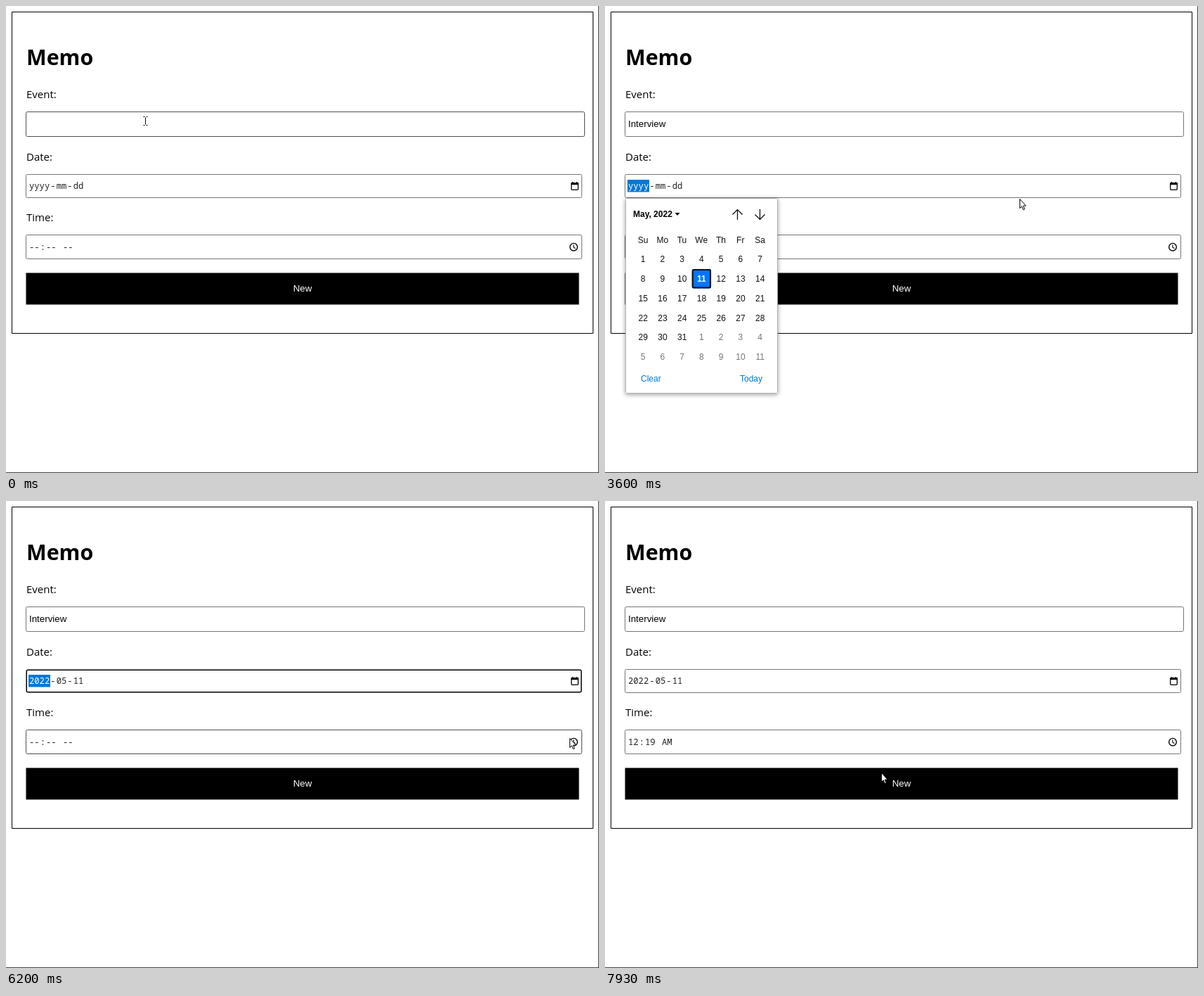
An HTML page with a canvas for the animation above (8000 ms loop, 844 px wide and 664 px high).

```html
<!DOCTYPE html>
<html lang="en">
<head>
<meta charset="utf-8">
<title>Memo form</title>
<style>
html, body { margin: 0; width: 100%; height: 100%; overflow: hidden; background: #fff; }
canvas { display: block; }
</style>
</head>
<body>
<canvas id="stage" width="844" height="664"></canvas>
<script>
const ctx = document.getElementById('stage').getContext('2d');
const LOOP = 8000, STEP = 1000 / 15;
const SANS = '"Liberation Sans", Arial, sans-serif';
const UI = '"Open Sans", "Noto Sans", sans-serif';
const MONO = '12.2px "Noto Sans Mono", monospace';
const INK = '#101010', BLUE = '#0075ff', HOVER = '#b3d4ff', MARK = '#0078d7';

// Moments of the interaction
const FOCUS = 70, DATE_OPEN = 3330, DATE_SET = 5130, TIME_OPEN = 6400, TIME_SET = 7200, TIME_CLOSE = 7730;

// Mouse moves from rest to rest
const START = { x: 198, y: 163 };
const MOVES = [
  { from: 2400, to: 2670, x: 806, y: 226 },
  { from: 2800, to: 3070, x: 822, y: 246 },
  { from: 3130, to: 3270, x: 809, y: 251 },
  { from: 3400, to: 3730, x: 475, y: 288 },
  { from: 3800, to: 4530, x: 156, y: 377 },
  { from: 4670, to: 4870, x: 139, y: 384 },
  { from: 5200, to: 6130, x: 802, y: 338 },
  { from: 6400, to: 6930, x: 143, y: 390 },
  { from: 7000, to: 7130, x: 166, y: 385 },
  { from: 7270, to: 7600, x: 369, y: 507 },
  { from: TIME_CLOSE, to: 7930, x: 393, y: 387 }
];

const ease = k => k * k * (3 - 2 * k);

function mouseAt(t) {
  return MOVES.reduce((p, m) => {
    const k = ease(Math.min(1, Math.max(0, (t - m.from) / (m.to - m.from))));
    return { x: p.x + (m.x - p.x) * k, y: p.y + (m.y - p.y) * k };
  }, START);
}

// Typing slows down a little from key to key
const keyTime = i => 800 + 125 * i + 6.25 * i * i;

const inside = (p, x, y, w, h) => p.x >= x && p.x < x + w && p.y >= y && p.y < y + h;

function rect(x, y, w, h, color) {
  ctx.fillStyle = color;
  ctx.fillRect(x, y, w, h);
}

function text(s, x, y, font, color = '#000', align = 'left') {
  ctx.font = font;
  ctx.fillStyle = color;
  ctx.textAlign = align;
  ctx.fillText(s, x, y);
}

function box(x, y, w, h, fill, stroke, width = 1, radius = 2) {
  ctx.beginPath();
  ctx.roundRect(x, y, w, h, radius);
  if (fill) { ctx.fillStyle = fill; ctx.fill(); }
  if (stroke) { ctx.strokeStyle = stroke; ctx.lineWidth = width; ctx.stroke(); }
}

function line(points, width = 1) {
  ctx.beginPath();
  points.forEach(([x, y]) => ctx.lineTo(x, y));
  ctx.strokeStyle = '#000';
  ctx.lineWidth = width;
  ctx.stroke();
}

function field(x, y, w, h, focused, hovered) {
  if (focused) box(x + 1.25, y + 1.25, w - 2.5, h - 2.5, '#fff', '#000', 1.5);
  else box(x + .5, y + .5, w - 1, h - 1, '#fff', hovered ? '#4f4f4f' : '#767676');
}

// Parts of a date or time value, the first one optionally selected
function segments(parts, baseline, selected) {
  let x = 32;
  parts.forEach((part, i) => {
    const pad = i % 2 ? 0 : 1;
    const w = part.length * 7.33 + pad * 2;
    const marked = selected && i === 0;
    if (marked) rect(x, baseline - 13, Math.round(w), 17.5, MARK);
    text(part, x + pad, baseline, MONO, marked ? '#fff' : '#222');
    x += w;
  });
}

function popup(x, y, w, h) {
  ctx.save();
  ctx.shadowColor = 'rgba(0,0,0,.4)';
  ctx.shadowBlur = 6;
  ctx.shadowOffsetY = 1.5;
  box(x, y, w, h, '#fff', null, 1, 1);
  ctx.restore();
  box(x + .5, y + .5, w - 1, h - 1, '#fff', '#b4b4b4', 1, 1);
}

function cell(label, x, y, w, h, size, { chosen, ring, hovered, color = INK }) {
  if (chosen || hovered) box(x, y, w, h, chosen ? BLUE : HOVER);
  if (ring) box(x + 1, y + 1, w - 2, h - 2, null, INK, 2);
  text(label, x + w / 2, y + h / 2 + size * .36, `${chosen ? 'bold ' : ''}${size}px ${SANS}`,
    chosen ? '#fff' : color, 'center');
}

// Vertical arrow, dir -1 points up and 1 points down
function arrow(x, dir) {
  const y = 296.5, tip = y + dir * 7;
  line([[x, y - dir * 7.5], [x, tip]], 1.2);
  line([[x - 7, y], [x, tip], [x + 7, y]], 1.2);
}

function calendar(mouse) {
  const pitch = 27.75, font = `12px ${SANS}`;
  popup(29, 273, 217, 278);
  text('May, 2022', 40, 300, `bold ${font}`);
  ctx.beginPath();
  ctx.moveTo(99.5, 294);
  ctx.lineTo(106.5, 294);
  ctx.lineTo(103, 298);
  ctx.fill();
  arrow(188.5, -1);
  arrow(220.5, 1);
  ['Su', 'Mo', 'Tu', 'We', 'Th', 'Fr', 'Sa'].forEach((day, i) =>
    text(day, 54 + i * pitch, 337, font, INK, 'center'));
  for (let i = 0; i < 42; i++) {
    const x = 40.5 + i % 7 * pitch, y = 346.25 + Math.floor(i / 7) * pitch;
    cell(i % 31 + 1, x, y, 27.3, 27.5, 12, {
      chosen: i === 10,
      ring: i === 10,
      hovered: inside(mouse, x, y, pitch, pitch),
      color: i > 30 ? '#767676' : INK
    });
  }
  text('Clear', 51, 534, font, MARK);
  text('Today', 192, 534, font, MARK);
}

function timeList(mouse, picked) {
  const two = n => String(n).padStart(2, '0');
  popup(29, 360, 171, 257);
  for (let row = 0; row < 7; row++) {
    [two(row || 12), two(19 + row), ['AM', 'PM'][row]].forEach((label, col) => {
      if (!label) return;
      const x = 33 + col * 55.5, y = 364 + row * 35.65;
      cell(label, x, y, 52, 35.3, 14, {
        chosen: row === 0,
        ring: row === 0 && col === (picked ? 2 : 0),
        hovered: inside(mouse, x, y, 52, 35.3)
      });
    });
  }
}

function icons() {
  box(804.7, 252, 9.6, 9.3, null, '#000', 1.3, 1);
  rect(804, 251.3, 11, 2.9, '#000');
  for (const x of [806, 811.7]) rect(x, 250, 1.3, 2, '#000');
  ctx.beginPath();
  ctx.arc(808, 342.7, 5.3, 0, Math.PI * 2);
  ctx.lineWidth = 1.4;
  ctx.stroke();
  line([[807.8, 339.5], [807.8, 343], [810.5, 344.7]], 1.1);
}

function pointer({ x, y }, beam) {
  ctx.save();
  ctx.translate(Math.round(x) + .5, Math.round(y) + .5);
  if (beam) {
    line([[0, -5], [0, 5]]);
    for (const side of [-6, 6]) {
      line([[-3, side], [-1, side]]);
      line([[1, side], [3, side]]);
    }
  } else {
    const outline = new Path2D('M0-1V12L2.8 9.4 4.8 14.3 6.8 13.4 4.8 8.7 8.6 8.5Z');
    ctx.fillStyle = '#fff';
    ctx.fill(outline);
    ctx.strokeStyle = '#000';
    ctx.lineWidth = 1;
    ctx.stroke(outline);
  }
  ctx.restore();
}

function eventField(t, hovered) {
  const typing = t >= FOCUS && t < DATE_OPEN;
  let count = 0;
  while (count < 9 && keyTime(count) <= t) count++;
  const word = 'Interview'.slice(0, count);
  const lastInput = count ? keyTime(count - 1) : FOCUS;
  field(28, 150, 796, 36, typing, hovered);
  text(word, 33, 172, `13.333px ${SANS}`);
  if (typing && (t - lastInput) % 1000 < 500) {
    rect(Math.round(33 + ctx.measureText(word).width) - (word ? 1 : 0), 161, 1, 14, '#000');
  }
}

function draw(t) {
  const mouse = mouseAt(t);
  const dateOpen = t >= DATE_OPEN && t < DATE_SET;
  const dateFocus = t >= DATE_SET && t < TIME_OPEN;
  const timeOpen = t >= TIME_OPEN && t < TIME_CLOSE;
  const overEvent = inside(mouse, 28, 150, 796, 36);
  const overCalendar = dateOpen && inside(mouse, 29, 273, 217, 278);

  rect(0, 0, 844, 664, '#fff');
  rect(843, 0, 1, 664, '#444');
  rect(0, 663, 844, 1, '#444');
  box(8.5, 8.5, 827, 457, null, '#000', 1, 0);

  text('Memo', 29, 84, `bold 30.4px ${UI}`);
  text('Event:', 29, 131, `15px ${UI}`);
  text('Date:', 29, 220, `15px ${UI}`);
  text('Time:', 29, 306, `15px ${UI}`);

  eventField(t, overEvent);

  field(28, 239, 792, 34, dateFocus, inside(mouse, 28, 239, 792, 34));
  segments(t < DATE_SET ? ['yyyy', '-', 'mm', '-', 'dd'] : ['2022', '-', '05', '-', '11'],
    260, dateOpen || dateFocus);

  field(28, 325, 792, 35, false, !overCalendar && inside(mouse, 28, 325, 792, 35));
  segments(t < TIME_SET ? ['--', ':', '--', ' ', '--'] : ['12', ':', '19', ' ', 'AM'], 347, timeOpen);
  icons();

  rect(28.5, 379.5, 787, 45, '#000');
  text('New', 422, 406, `13.333px ${SANS}`, '#fff', 'center');

  if (dateOpen) calendar(mouse);
  if (timeOpen) timeList(mouse, t >= TIME_SET);
  pointer(mouse, overEvent);
}

function tick() {
  // The picture advances 15 times per second, on times rounded to 10 ms
  const step = Math.floor((performance.now() % LOOP + 4) / STEP);
  draw(Math.round(step * STEP / 10) * 10 % LOOP);
  requestAnimationFrame(tick);
}
tick();
</script>
</body>
</html>
```
